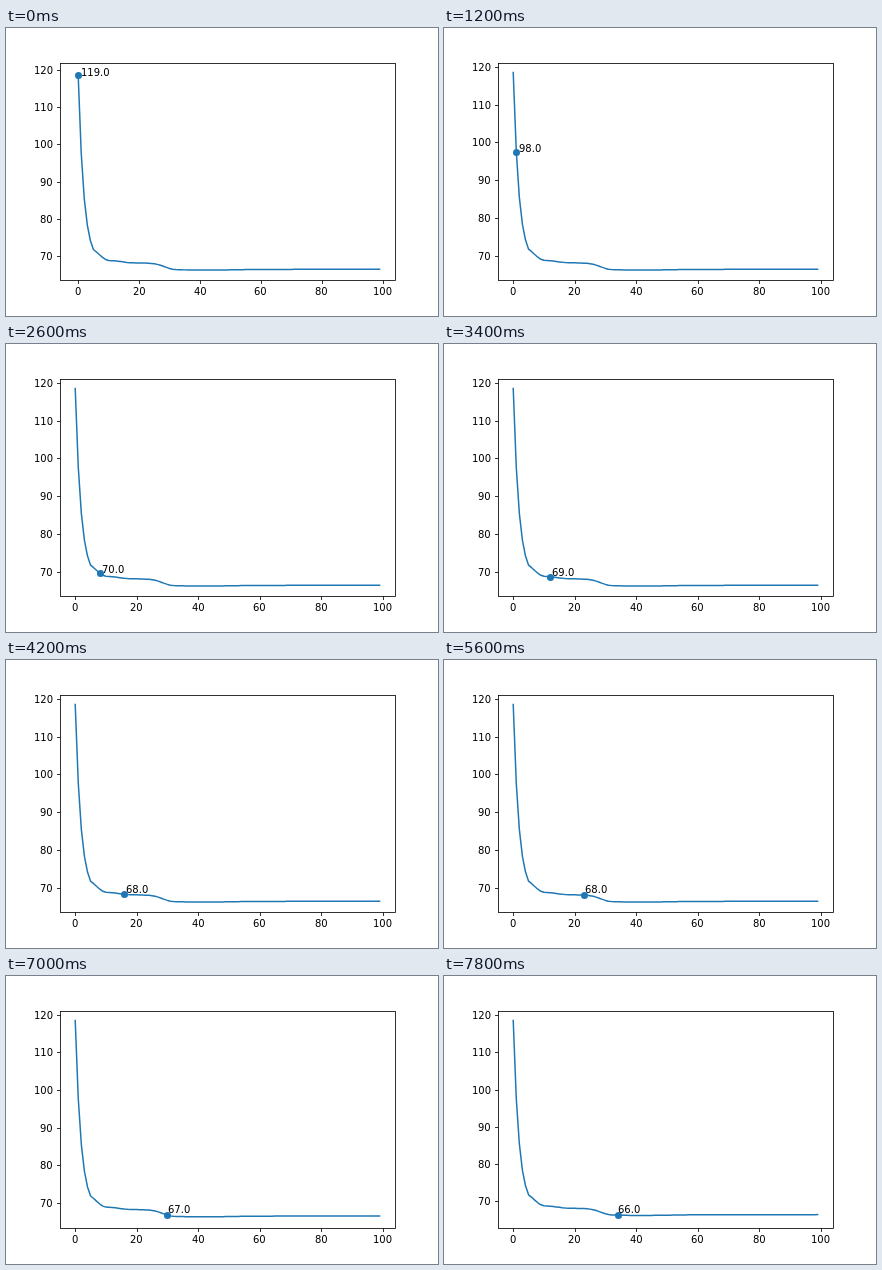
These frames come from a looping animation (432 by 288 pixels, 8 s). An HTML page with a canvas:

```html
<!DOCTYPE html>
<html lang="en">
<head>
<meta charset="utf-8">
<title>Curve with moving marker</title>
<style>
  html, body { margin: 0; width: 100%; height: 100%; overflow: hidden; background: #fff; }
  canvas { display: block; }
</style>
</head>
<body>
<canvas id="stage" width="432" height="288"></canvas>
<script>
const ctx = document.getElementById('stage').getContext('2d');
const LOOP = 8000, STEP = 200, HOLD_STEPS = 5;
const BLUE = '#1f77b4';
const BOX = { left: 54, right: 388.8, top: 34.56, bottom: 252 };
const MARGIN = 0.05, DOT = 3;

// Steep start, then a smooth curve through a few points [index, value].
const decay = i => 68.4 + 50.14 * 0.5824 ** i;
const KEYS = [
  [5, decay(5)], [10, 68.8], [12, 68.7], [17, 68.22], [24, 68.02],
  [26, 67.75], [32, 66.35], [41, 66.21], [60, 66.39], [99, 66.44]
];

function slope(k) {
  const [x0, y0] = KEYS[k], [x1, y1] = KEYS[k + 1];
  return (y1 - y0) / (x1 - x0);
}

// Harmonic mean of the neighbouring slopes keeps the curve free of overshoot.
function tangent(k) {
  if (k === 0) return slope(0);
  if (k === KEYS.length - 1) return slope(k - 1);
  const a = slope(k - 1), b = slope(k);
  return a * b > 0 ? 2 * a * b / (a + b) : 0;
}

function valueAt(i) {
  if (i <= KEYS[0][0]) return decay(i);
  const k = KEYS.findIndex(p => p[0] >= i) - 1;
  const [x0, y0] = KEYS[k], [x1, y1] = KEYS[k + 1];
  const h = x1 - x0, t = (i - x0) / h;
  return y0 + (y1 - y0) * t * t * (3 - 2 * t)
    + h * t * (1 - t) * ((1 - t) * tangent(k) - t * tangent(k + 1));
}

const data = Array.from({ length: 100 }, (_, i) => valueAt(i));
const LOW = Math.min(...data), HIGH = Math.max(...data), LAST = data.length - 1;

// Usable size once the margin on both sides is taken off.
const inner = size => size / (1 + 2 * MARGIN);
const W = inner(BOX.right - BOX.left), H = inner(BOX.bottom - BOX.top);
const X0 = BOX.left + W * MARGIN, Y0 = BOX.top + H * MARGIN;

// The axes grow so that the whole dot counts as data.
function makeScale(i) {
  const padX = DOT * LAST / W, padY = DOT * (HIGH - LOW) / H;
  const xMin = Math.min(0, i - padX), xMax = Math.max(LAST, i + padX);
  const yMin = Math.min(LOW, data[i] - padY), yMax = Math.max(HIGH, data[i] + padY);
  return {
    x: v => X0 + (v - xMin) * W / (xMax - xMin),
    y: v => Y0 + (yMax - v) * H / (yMax - yMin)
  };
}

function line(x0, y0, x1, y1) {
  ctx.beginPath();
  ctx.moveTo(x0, y0);
  ctx.lineTo(x1, y1);
  ctx.stroke();
}

// Align: 0 left, 0.5 centre, 1 right. The first glyph starts on a whole pixel.
function drawText(text, x, y, align) {
  const m = ctx.measureText(text), bearing = -m.actualBoundingBoxLeft;
  ctx.fillText(text, Math.round(x - align * m.width + bearing) - bearing, Math.round(y));
}

function drawCurve(s) {
  ctx.strokeStyle = BLUE;
  ctx.lineWidth = 1.5;
  ctx.lineCap = 'square';
  ctx.lineJoin = 'round';
  ctx.beginPath();
  data.forEach((v, i) => ctx.lineTo(s.x(i), s.y(v)));
  ctx.stroke();
}

function drawDot(s, i) {
  ctx.fillStyle = BLUE;
  ctx.beginPath();
  ctx.arc(Math.round(s.x(i)) + 0.5, Math.round(s.y(data[i])) + 0.5, DOT + 0.5, 0, 2 * Math.PI);
  ctx.fill();
}

function drawAxes(s) {
  ctx.strokeStyle = ctx.fillStyle = '#000';
  ctx.lineWidth = 0.8;
  ctx.lineCap = 'butt';
  ctx.lineJoin = 'miter';
  ctx.strokeRect(54.5, 35.5, 335, 217);

  for (let v = 0; v <= 100; v += 20) {
    const x = s.x(v), px = Math.round(x) + 0.5;
    line(px, 252.5, px, 256);
    drawText(String(v), x, 267, 0.5);
  }
  for (let v = 70; v <= 120; v += 10) {
    const y = Math.round(s.y(v));
    line(51, y + 0.5, 54.5, y + 0.5);
    drawText(String(v), 47, y + 4, 1);
  }
}

// The label slowly drifts against the dot.
function drawLabel(s, i) {
  const x = s.x(i) + 2.9 - 0.066 * i, y = s.y(data[i]) + 0.3 - 0.085 * i;
  drawText(Math.round(data[i]).toFixed(1), x, y, 0);
}

function draw(time) {
  const i = Math.max(0, Math.floor(time / STEP) - HOLD_STEPS);
  const s = makeScale(i);
  ctx.fillStyle = '#fff';
  ctx.fillRect(0, 0, 432, 288);
  ctx.font = '10px "DejaVu Sans", sans-serif';
  ctx.textBaseline = 'alphabetic';
  drawDot(s, i);
  drawCurve(s);
  drawAxes(s);
  drawLabel(s, i);
}

function tick() {
  draw(performance.now() % LOOP);
  requestAnimationFrame(tick);
}
tick();
</script>
</body>
</html>
```
